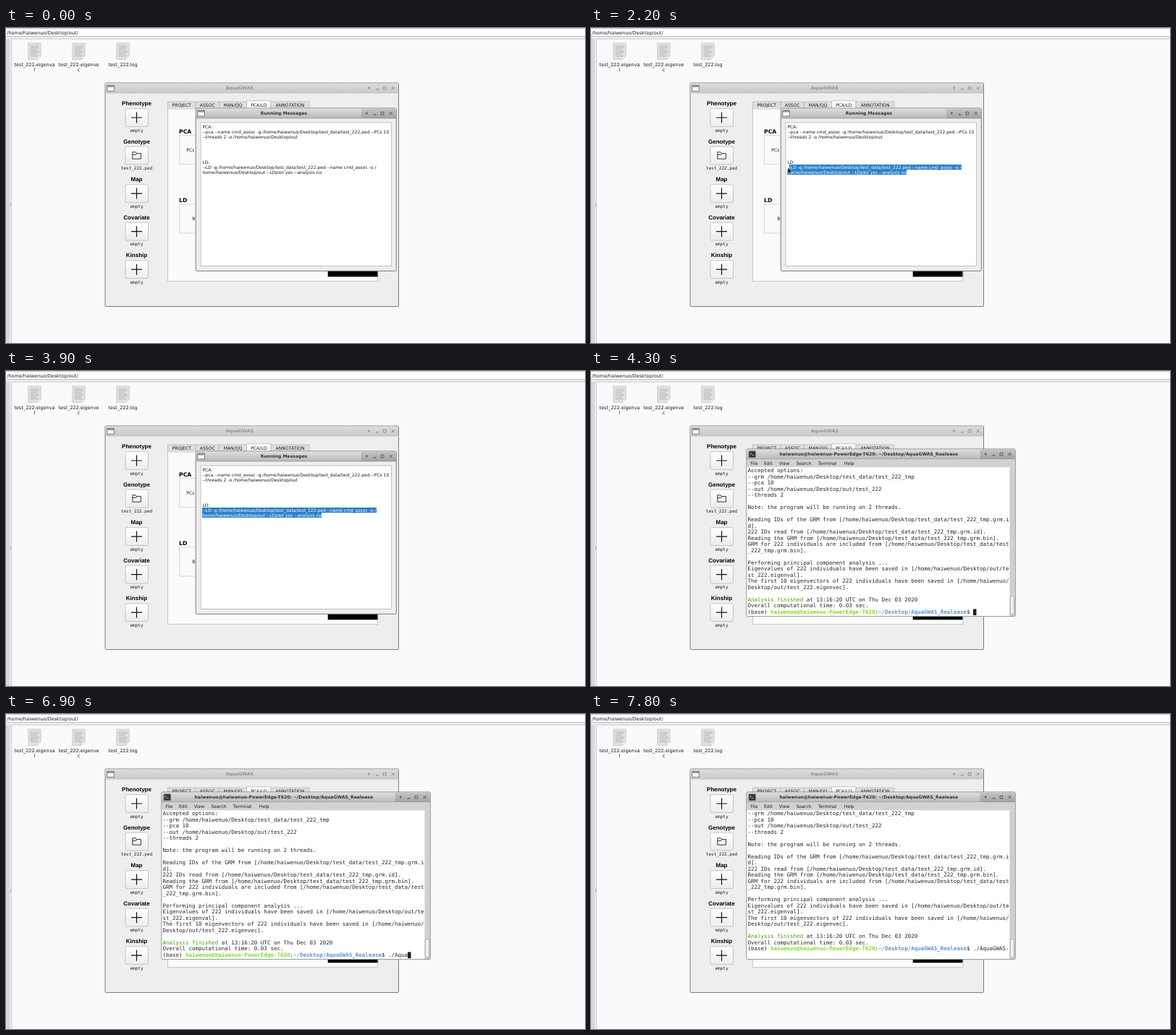
Recreate the animation shown at these times as an HTML page. Size 800 px wide and 436 px high, loop 8 s.

```html
<!DOCTYPE html>
<html lang="en">
<head>
<meta charset="utf-8">
<title>Desktop session</title>
<style>
  html, body { margin: 0; width: 100%; height: 100%; overflow: hidden; background: #fbf9fc; }
  svg { display: block; width: 800px; height: 436px; }
  text { font: 6.1px "DejaVu Sans", sans-serif; fill: #1c1c1c; white-space: pre; text-rendering: geometricPrecision; }
  .mid { text-anchor: middle; }
  .path { font-size: 6.5px; }
  .title { font-weight: bold; text-anchor: middle; fill: #333; }
  .idle { fill: #929292; }
  .heading { font: bold 8px "Liberation Sans", sans-serif; text-anchor: middle; fill: #000; }
  .status { font: 6px "DejaVu Sans Mono", monospace; text-anchor: middle; }
  .section { font-size: 7.7px; font-weight: bold; fill: #000; }
  .message { font-size: 6px; }
  .light { fill: #fff; }
  .term { font: 7.5px "DejaVu Sans Mono", monospace; fill: #262626; }
  .done { fill: #4e9a06; }
  .user { fill: #7fdc2c; font-weight: bold; }
  .dir { fill: #5e94cb; font-weight: bold; }
</style>
</head>
<body>
<svg id="stage" viewBox="0 0 800 436">
  <defs>
    <linearGradient id="active" x2="0" y2="1"><stop stop-color="#dedede"/><stop offset="1" stop-color="#b9b9b9"/></linearGradient>
    <linearGradient id="inactive" x2="0" y2="1"><stop stop-color="#dcdcdc"/><stop offset="1" stop-color="#c9c9c9"/></linearGradient>
    <linearGradient id="controls" x2="0" y2="1"><stop stop-color="#c4c4c4"/><stop offset="1" stop-color="#a2a2a2"/></linearGradient>
    <linearGradient id="button" x2="0" y2="1"><stop stop-color="#ffffff"/><stop offset="1" stop-color="#ececec"/></linearGradient>
    <clipPath id="selected"><rect id="clip1" y="189" height="7.3"/><rect id="clip2" y="196.3" height="7"/></clipPath>
    <clipPath id="screen"><rect x="215.5" y="133.3" width="363" height="205.9"/></clipPath>
  </defs>
</svg>
<script>
const stage = document.getElementById('stage');
const USER = 'haiwenuo';
const HOME = `/home/${USER}/Desktop`;

function add(tag, attrs, parent = stage, content = '') {
  const node = document.createElementNS('http://www.w3.org/2000/svg', tag);
  for (const key in attrs) node.setAttribute(key, attrs[key]);
  node.textContent = content;
  parent.append(node);
  return node;
}
const group = (attrs = {}, parent = stage) => add('g', attrs, parent);
const rect = (x, y, width, height, fill, parent, more = {}) =>
  add('rect', { x, y, width, height, fill, ...more }, parent);
const label = (content, x, y, cls = '', parent = stage) => add('text', { x, y, class: cls }, parent, content);
const line = (d, stroke, parent, width = 0.8) =>
  add('path', { d, stroke, fill: 'none', 'stroke-width': width }, parent);

function windowFrame(g, x, y, w, h, title, isActive) {
  const barHeight = 14, mid = y + 7;
  rect(x, y, w, h, '#efeeef', g, { stroke: '#7c7c7c', 'stroke-width': 1, rx: 1.5 });
  rect(x + .5, y + .5, w - 1, barHeight - .5, `url(#${isActive ? 'active' : 'inactive'})`, g);
  if (isActive) rect(x + w - 48.5, y + .5, 48, barHeight - .5, 'url(#controls)', g);
  line(`M${x} ${y + barHeight}h${w}`, isActive ? '#8d8d8d' : '#bababa', g, .7);
  label(title, x + w / 2 - (isActive ? 16.8 : 17), mid + 2.3, isActive ? 'title' : 'title idle', g);
  const ink = isActive ? '#4a4a4a' : '#858585', right = x + w;
  line(`M${right - 41} ${mid - 2}v4m-1.7 -2h3.4`, ink, g);
  line(`M${right - 31.5} ${mid + 1.8}h3.6`, ink, g, 1.1);
  line(`M${right - 21.2} ${mid - 1.8}h3.8v3.8h-3.8z`, ink, g);
  line(`M${right - 9.7} ${mid - 1.9}l4 4m0 -4l-4 4`, ink, g, .9);
}

function windowIcon(g, x, y) {
  rect(x, y, 9.5, 8, '#f7f7f7', g, { stroke: '#5d6862', 'stroke-width': .8 });
  rect(x + .4, y + .4, 8.7, 2, '#7b8d86', g);
}

// File manager
rect(0, 0, 800, 15, '#ebeaec');
rect(0, .8, 800, 10.4, '#ffffff');
line('M0 .5H800M0 11.6H800', '#b4b4b6');
rect(0, 15, 8, 421, '#eeedf0');
rect(0, 15, 5.3, 421, '#d5d7e1');
line('M7.6 436V15.3H800', '#c0c0c5', stage, .7);
line('M6.5 242v5', '#999', stage, .7);
label(`${HOME}/out/`, 1.3, 8.6, 'path');
[['test_222.eigenva', 'l'], ['test_222.eigenve', 'c'], ['test_222.log']].forEach((name, i) => {
  const x = 39.5 + i * 61;
  add('path', { d: `M${x - 8.7} 21h17.4v17.5l-5 5h-12.4z`, fill: '#e2e2e2', stroke: '#c2c2c2', 'stroke-width': .7 });
  add('path', { d: `M${x + 8.7} 38.5h-5v5z`, fill: '#f7f7f7', stroke: '#bdbdbd', 'stroke-width': .5 });
  for (let row = 0; row < 7; row++)
    line(`M${x - 6} ${25 + row * 2.3}h${row % 3 == 2 ? 9 : 12}`, '#a9a9a9', stage, .8);
  name.forEach((part, row) => label(part, x, 53.2 + row * 7, 'path mid'));
});

// Application window
const app = group();
windowFrame(app, 137, 76, 405.5, 309.5, 'AquaGWAS', false);
windowIcon(app, 139.8, 79.3);
['Phenotype', 'Genotype', 'Map', 'Covariate', 'Kinship'].forEach((name, i) => {
  const y = 124 + i * 52.55;
  label(name, 180.5, y - 16.8, 'heading', app);
  rect(165, y - 12.4, 31.5, 24.8, 'url(#button)', app, { stroke: '#bcbcbc', 'stroke-width': .8, rx: 1.5 });
  if (i == 1) line(`M174.8 ${y + 4.6}v-9.4h4.2l1.4 1.8h6v7.6zm0 -5.8h5l1.2 -1.6`, '#222', app, .9);
  else line(`M173 ${y}h15m-7.5 -7.5v15`, '#111', app, 1.2);
  label(i == 1 ? 'test_222.ped' : 'empty', 180.5, y + 19.8, 'status', app);
});
rect(223.5, 112, 290.5, 238.5, '#fcfbfc', app, { stroke: '#bebebe', 'stroke-width': .8 });
const tabs = [['PROJECT', 223.5, 262], ['ASSOC', 262, 294.5], ['MAN/QQ', 294.5, 332.5],
  ['PCA/LD', 332.5, 366], ['ANNOTATION', 366, 419]];
tabs.forEach(([name, left, right], i) => {
  const open = i == 3;
  rect(left, open ? 100.6 : 102, right - left, open ? 11.8 : 10, open ? '#fcfbfc' : '#dedddf', app);
  line(`M${left} 112V${open ? 100.6 : 102}H${right}V112`, '#b3b3b3', app, .7);
  label(name, (left + right) / 2, 109, 'mid', app);
});
[['PCA', 148.5, 'PCs', 249.3], ['LD', 244, 'B', 257.3]].forEach(([name, y, field, x]) => {
  label(name, 239, y - 2.8, 'section', app);
  rect(239.5, y, 250, 40, 'none', app, { stroke: '#c6c6c6', 'stroke-width': .7 });
  label(field, x, y + 22.2, '', app);
});
rect(444.7, 325, 68.8, 19.3, '#000', app);

// Message window
const messages = group();
windowFrame(messages, 262.3, 111, 277, 225.3, 'Running Messages', true);
windowIcon(messages, 264.8, 114);
rect(269, 131, 263.5, 198.5, '#fff', messages, { stroke: '#b5b5b5', 'stroke-width': .8 });
const commandLines = [
  [8, `--LD -g ${HOME}/test_data/test_222.ped --name cmd_assoc -o /`],
  [9, `${HOME.slice(1)}/out --LDplot yes --analysis no`],
];
const messageLines = [
  [0, 'PCA:'],
  [1, `--pca --name cmd_assoc -g ${HOME}/test_data/test_222.ped --PCs 10`],
  [2, `--threads 2 -o ${HOME}/out`],
  [7, 'LD:'],
  ...commandLines,
];
const writeMessage = (cls, parent) => ([row, content]) => label(content, 271.5, 138.6 + row * 7.02, cls, parent);
messageLines.forEach(writeMessage('message', messages));
const marked = group({ 'clip-path': 'url(#selected)' }, messages);
rect(271, 189, 242, 14.3, '#2c80ca', marked);
commandLines.forEach(writeMessage('message light', marked));

// Terminal
const COL = 4.515, ROW = 8.513, LEFT = 216.4, PROMPT_COLS = 69;
const host = `${USER}@${USER}-PowerEdge-T620`, folder = '~/Desktop/AquaGWAS_Realease';
const terminal = group();
windowFrame(terminal, 215, 108, 371.2, 231.6, `${host}: ${folder}`, true);
rect(218, 110.8, 9.5, 9, '#34383a', terminal, { rx: 1, stroke: '#777', 'stroke-width': .6 });
line('M219.6 113l1.8 1.4l-1.8 1.4m2.6 .6h2.4', '#eee', terminal, .7);
rect(215.5, 122.4, 370.2, 11, '#d2d1d3', terminal);
[['File', 220.3], ['Edit', 239], ['View', 259.8], ['Search', 283.5], ['Terminal', 313.8], ['Help', 349.8]]
  .forEach(([name, x]) => label(name, x, 129.9, '', terminal));
rect(215.5, 133.3, 363, 205.9, '#fff', terminal);
rect(578.5, 133.3, 7.2, 205.9, '#cfcfd0', terminal);
rect(579.3, 311.5, 5.4, 25.5, '#f0f0f0', terminal, { rx: 2, stroke: '#909090', 'stroke-width': .7 });
const screen = group({ 'clip-path': 'url(#screen)' }, terminal);
const output = group({}, screen);
const data = `${HOME}/test_data/test_222_tmp`;
const log = `Accepted options:
--grm ${data}
--pca 10
--out ${HOME}/out/test_222
--threads 2

Note: the program will be running on 2 threads.

Reading IDs of the GRM from [${data}.grm.id].
222 IDs read from [${data}.grm.id].
Reading the GRM from [${data}.grm.bin].
GRM for 222 individuals are included from [${data}.grm.bin].

Performing principal component analysis ...
Eigenvalues of 222 individuals have been saved in [${HOME}/out/test_222.eigenval].
The first 10 eigenvectors of 222 individuals have been saved in [${HOME}/out/test_222.eigenvec].
`;
const wrapped = log.split('\n').flatMap(s => s.match(/.{1,80}/g) || ['']);
const rowY = row => 140.2 + row * ROW;
wrapped.forEach((s, row) => label(s, LEFT, rowY(row), 'term', output));

function styledRow(row, parts) {
  const node = label('', LEFT, rowY(row), 'term', output);
  return parts.map(([content, cls = '']) => add('tspan', { class: cls }, node, content));
}
styledRow(21, [['Analysis finished', 'done'], [' at 13:16:20 UTC on Thu Dec 03 2020']]);
styledRow(22, [['Overall computational time: 0.03 sec.']]);
const typed = styledRow(23, [['(base) '], [host, 'user'], [':'], [folder, 'dir'], ['$ '], ['']]).pop();
const cursor = rect(0, 329.5, COL, 8.6, '#1e1e1e', screen);

const pointer = add('path', {
  d: 'M0 0V8.6L2 6.9L3.4 10L4.9 9.4L3.5 6.4H6.2Z', fill: '#111', stroke: '#fff', 'stroke-width': .6,
});

// Each path is a list of [time, x, y] and ends when the pointer leaves
const pointerPaths = [
  { until: 3600, keys: [[200, 358, 173], [500, 395, 230], [1000, 437, 198], [1100, 425, 198], [1200, 363, 193],
    [1300, 313, 191], [1500, 285, 190], [1900, 274, 192], [2100, 274, 192], [2200, 272, 193], [2300, 280, 191],
    [2400, 283, 191], [2500, 283, 191], [3300, 401, 216], [3400, 401, 216], [3500, 282, 146]] },
  { until: 5900, keys: [[4400, 300, 34], [4900, 474, 203], [5100, 474, 203], [5200, 449, 274]] },
];
const keystrokes = [[5900, '.'], [6000, '/'], [6500, 'A'], [6700, 'q'], [6800, 'u'], [6900, 'a'],
  [7500, 'G'], [7600, 'W'], [7700, 'A'], [7800, 'S-']];

function pointerAt(t) {
  const path = pointerPaths.find(p => t >= p.keys[0][0] && t < p.until);
  if (!path) return null;
  const next = path.keys.findIndex(k => k[0] > t);
  if (next < 0) return path.keys.at(-1).slice(1);
  const [t0, x0, y0] = path.keys[next - 1], [t1, x1, y1] = path.keys[next];
  const f = (t - t0) / (t1 - t0);
  return [x0 + (x1 - x0) * f, y0 + (y1 - y0) * f];
}

function setSpan(id, from, to) {
  const node = document.getElementById(id);
  node.setAttribute('x', from);
  node.setAttribute('width', Math.max(0, to - from));
}

// The selection trails the pointer by one step
function select(t) {
  let first = 512, second = 436;
  if (t >= 2300) first = second = 271;
  else if (t >= 1100) {
    const [x, y] = pointerAt(t - 100);
    if (y < 196) { first = x; second = 271; } else second = x;
  }
  setSpan('clip1', first, 512);
  setSpan('clip2', second, 436);
}

function render(now) {
  const t = Math.floor(now % 8000 / 100) * 100;
  const at = pointerAt(t);
  pointer.setAttribute('visibility', at ? 'visible' : 'hidden');
  if (at) pointer.setAttribute('transform', `translate(${at})`);
  select(t);

  terminal.setAttribute('visibility', t >= 4300 ? 'visible' : 'hidden');
  const input = keystrokes.filter(k => k[0] <= t).map(k => k[1]).join('');
  const full = PROMPT_COLS + input.length >= 80;
  const blinkOff = t >= 5500 && t < 5900;
  typed.textContent = input;
  output.setAttribute('transform', `translate(0 ${full ? -ROW : 0})`);
  cursor.setAttribute('x', LEFT + (PROMPT_COLS + input.length) * COL);
  cursor.setAttribute('opacity', full || blinkOff ? 0 : 1);
}

const start = performance.now();
function frame() {
  render(performance.now() - start);
  requestAnimationFrame(frame);
}
frame();
</script>
</body>
</html>
```
